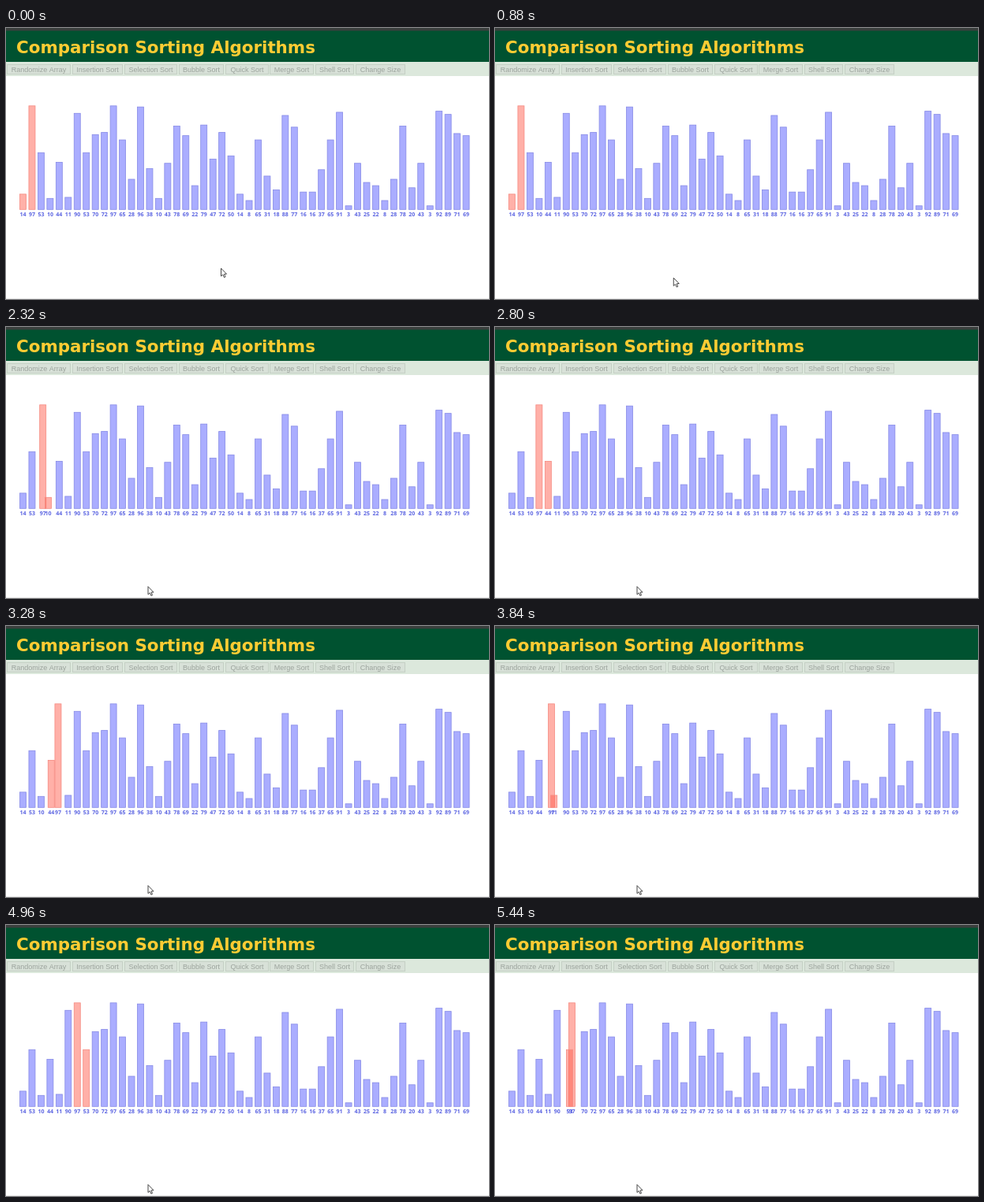
Recreate the animation shown at these times as an HTML page with a canvas. Size 612 by 344 pixels, loop 5520 ms.

```html
<!DOCTYPE html>
<html lang="en">
<head>
<meta charset="utf-8">
<title>Comparison Sorting Algorithms</title>
<style>
  html, body { margin: 0; width: 100%; height: 100%; overflow: hidden; background: #fff; }
  canvas { display: block; }
</style>
</head>
<body>
<canvas id="stage" width="612" height="344"></canvas>
<script>
const ctx = document.getElementById('stage').getContext('2d');
const LOOP = 5520, STEP = 80, SWAP = 400;

const values = [
  14, 97, 53, 10, 44, 11, 90, 53, 70, 72, 97, 65, 28, 96, 38, 10, 43, 78, 69, 22,
  79, 47, 72, 50, 14, 8, 65, 31, 18, 88, 77, 16, 16, 37, 65, 91, 3, 43, 25, 22,
  8, 28, 78, 20, 43, 3, 92, 89, 71, 69];

// Label, left edge and width of each toolbar button
const buttons = [
  ['Randomize Array', 1, 81], ['Insertion Sort', 84, 64], ['Selection Sort', 150, 67],
  ['Bubble Sort', 219, 57], ['Quick Sort', 278, 55], ['Merge Sort', 334, 56],
  ['Shell Sort', 392, 49], ['Change Size', 443, 63]];

// The second bar bubbles right, one swap at each of these times
const swapTimes = [1542, 2278, 3019, 3760, 4502, 5283];
const FIRST_COMPARE_END = 1200;

const clamp = u => Math.min(1, Math.max(0, u));
const easeOut = u => 1 - (1 - u) ** 2;
const smooth = u => u * u * (3 - 2 * u);

function rect(x, y, w, h, color) {
  ctx.fillStyle = color;
  ctx.fillRect(x, y, w, h);
}

function text(str, x, y, font, color, align = 'center') {
  ctx.font = font;
  ctx.fillStyle = color;
  ctx.textAlign = align;
  ctx.fillText(str, x, y);
}

function drawHeader() {
  rect(0, 0, 612, 344, '#fff');
  rect(0, 0, 612, 4, '#3a3f3d');
  rect(0, 3.5, 612, 39.5, '#005230');
  rect(0, 43, 612, 18, '#dce8dc');
  rect(0, 343, 612, 1, '#ececec');
  text('Comparison Sorting Algorithms', 13, 32,
    'bold 21.4px "DejaVu Sans", sans-serif', '#ffcc33', 'left');
  for (const [label, x, w] of buttons) {
    rect(x, 46, w, 13, '#d8e1d8');
    ctx.strokeStyle = '#c5d0c5';
    ctx.lineWidth = 1;
    ctx.strokeRect(x + .5, 46.5, w - 1, 12);
    text(label, x + w / 2, 55.7, '9px "Liberation Sans", sans-serif', '#9ca49d');
  }
}

function drawBar(value, slot, active) {
  const x = 21.5 + 11.46 * slot, h = value * 1.35 + .5;
  rect(x - 4, 230.3 - h, 8, h, active ? 'rgba(255,98,82,.5)' : '#aaadff');
  ctx.strokeStyle = active ? '#f58a80' : '#878be6';
  ctx.lineWidth = .8;
  ctx.strokeRect(x - 4, 230.3 - h, 8, h);
  text(value, x, 239, 'bold 7px "Open Sans", sans-serif', '#5c65e2');
}

function drawBars(t) {
  const progress = swapTimes.map(s => easeOut(clamp((t - s) / SWAP)));
  const swapped = progress.filter(p => p === 1).length;
  const partner = t < FIRST_COMPARE_END ? 0 : swapped + 2;
  const travelled = progress.reduce((a, b) => a + b, 0);
  values.forEach((v, i) => {
    const slot = i === 1 ? 1 + travelled : i - (progress[i - 2] || 0);
    drawBar(v, slot, i === 1 || i === partner);
  });
}

function drawCursor(t) {
  const move = (smooth(clamp(t / 480)) + smooth(clamp((t - 1120) / 320))) / 2;
  ctx.save();
  ctx.translate(272.5 - 92.5 * move, 305 + 24.5 * move);
  ctx.beginPath();
  [[0, 0], [0, 10], [2.3, 8], [3.9, 11.6], [5.5, 10.9], [4, 7.4], [7, 7.2]]
    .forEach(([x, y]) => ctx.lineTo(x, y));
  ctx.closePath();
  ctx.fillStyle = '#fff';
  ctx.fill();
  ctx.strokeStyle = '#333';
  ctx.lineWidth = .9;
  ctx.stroke();
  ctx.restore();
}

function frame() {
  const t = Math.floor(performance.now() % LOOP / STEP) * STEP;
  drawHeader();
  drawBars(t);
  drawCursor(t);
  requestAnimationFrame(frame);
}
frame();
</script>
</body>
</html>
```
